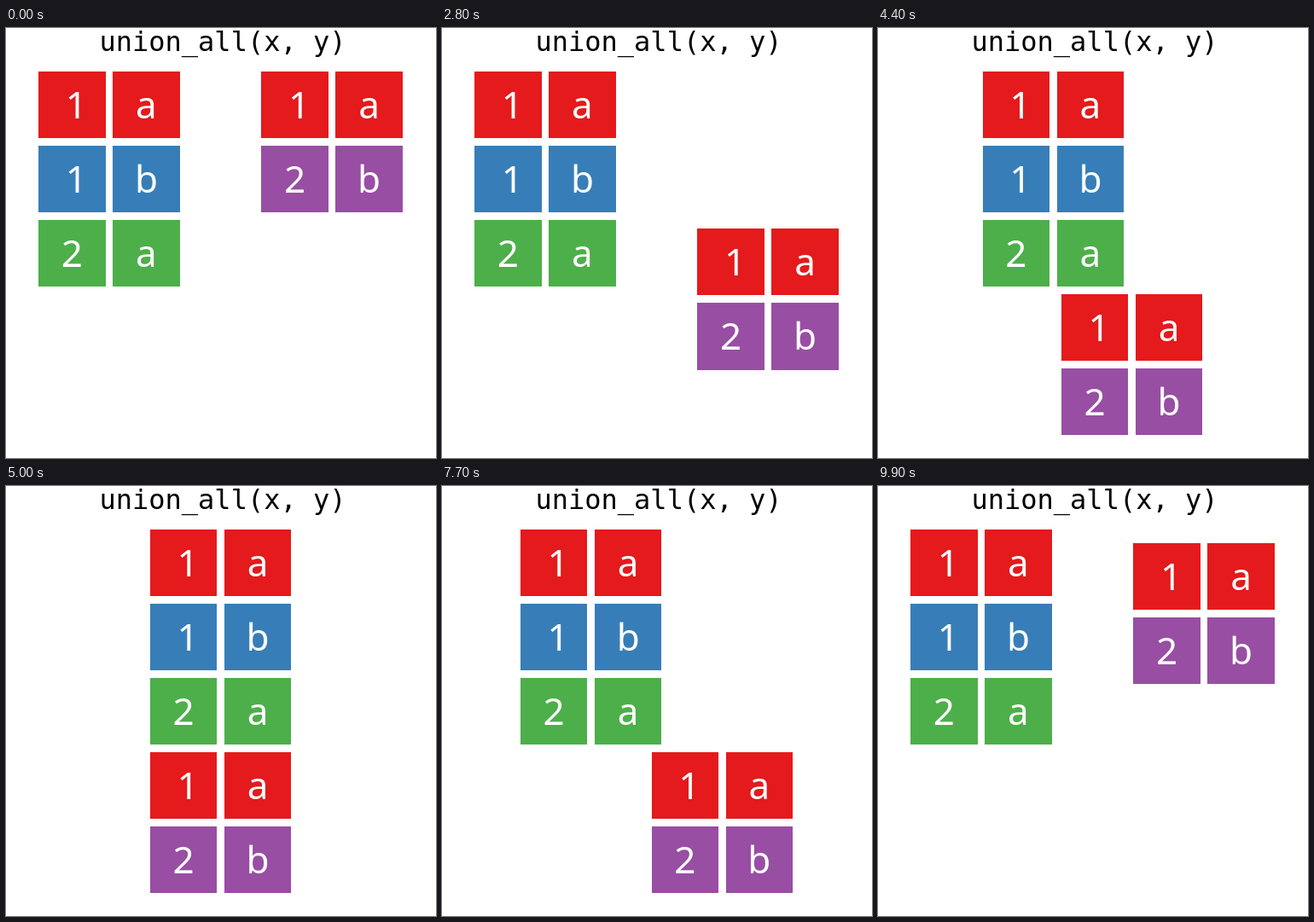
Recreate the animation shown at these times as an HTML page with a canvas. Size 504 by 504 pixels, loop 10 s.

```html
<!DOCTYPE html>
<html lang="en">
<head>
<meta charset="utf-8">
<title>union_all</title>
<style>
  html, body { margin: 0; width: 100%; height: 100%; overflow: hidden; background: #fff; }
  canvas { display: block; }
</style>
</head>
<body>
<canvas id="stage" width="504" height="504"></canvas>
<script>
const ctx = document.getElementById('stage').getContext('2d');
const RED = '#e41a1c', BLUE = '#377eb8', GREEN = '#4daf4a', PURPLE = '#984ea3';
const LOOP = 10000, STEP = 100;
const LEFT = 38.22, TOP = 50.75;
const PITCH_X = 87.05, PITCH_Y = 87.1;
const CELL_W = 78.35, CELL_H = 78.3;

const tableX = [['1', 'a', RED], ['1', 'b', BLUE], ['2', 'a', GREEN]];
const tableY = [['1', 'a', RED], ['2', 'b', PURPLE]];

// Linear progress from 0 to 1 between two times
const ramp = (t, from, to) => Math.min(1, Math.max(0, (t - from) / (to - from)));

function drawCell(x, y, text, color) {
  const left = Math.round(x), top = Math.round(y);
  ctx.fillStyle = color;
  ctx.fillRect(left, top, Math.round(x + CELL_W) - left, Math.round(y + CELL_H) - top);
  ctx.fillStyle = '#fff';
  // The narrow digit sits right of its cell's centre
  const nudge = text === '1' ? 5 : 0;
  ctx.fillText(text, x + CELL_W / 2 + nudge, y + 55.2);
}

function drawTable(rows, x, y) {
  ctx.font = '44px "Noto Sans", "Open Sans", sans-serif';
  rows.forEach(([key, value, color], i) => {
    drawCell(x, y + i * PITCH_Y, key, color);
    drawCell(x + PITCH_X, y + i * PITCH_Y, value, color);
  });
}

function draw(t) {
  const drop = ramp(t, 1600, 3300) - ramp(t, 8400, 10000);
  const join = ramp(t, 3300, 5000) - ramp(t, 6700, 8400);
  const shift = 1.5 * PITCH_X * join;

  ctx.fillStyle = '#fff';
  ctx.fillRect(0, 0, 504, 504);
  ctx.textAlign = 'center';
  ctx.fillStyle = '#000';
  ctx.font = '32px "DejaVu Sans Mono", monospace';
  ctx.fillText('union_all(x, y)', 254, 27);

  drawTable(tableX, LEFT + shift, TOP);
  drawTable(tableY, LEFT + 3 * PITCH_X - shift, TOP + 3 * PITCH_Y * drop);
}

const start = performance.now();
function tick() {
  const t = (performance.now() - start) % LOOP;
  draw(Math.floor(t / STEP) * STEP);
  requestAnimationFrame(tick);
}
tick();
</script>
</body>
</html>
```
